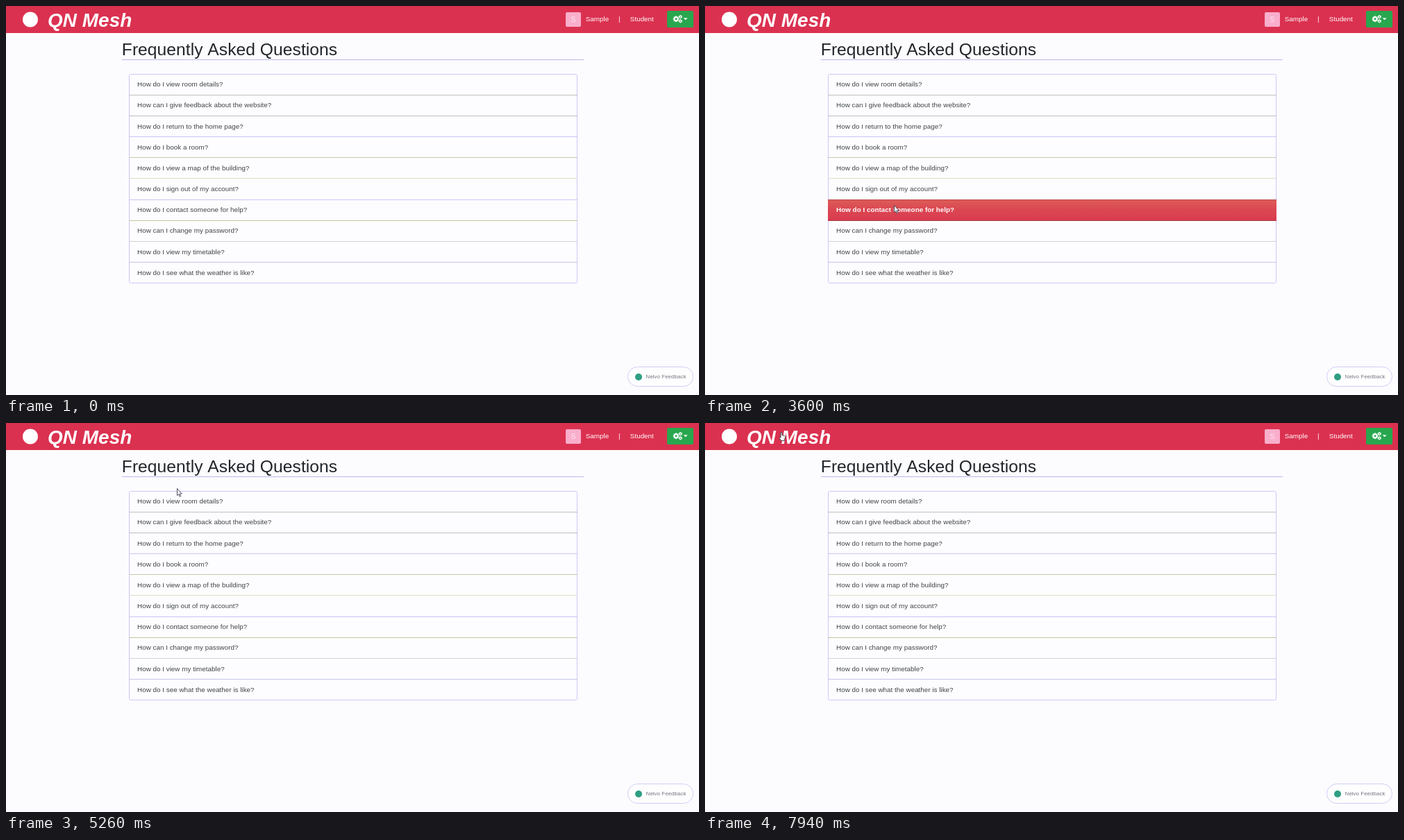
These frames come from a looping animation (998x561 px, 8 s). An HTML page with a canvas:

```html
<!DOCTYPE html>
<html lang="en">
<head>
<meta charset="utf-8">
<title>FAQ</title>
<style>
  html, body { margin: 0; width: 100%; height: 100%; overflow: hidden; background: #fcfcff; }
  canvas { display: block; }
</style>
</head>
<body>
<canvas id="stage" width="998" height="561"></canvas>
<script>
const ctx = document.getElementById('stage').getContext('2d');
const LOOP = 8000;
const HOVER_LAG = 80;
const LIST = { left: 177, right: 823, top: 97.6, step: 30.15 };

const questions = [
  'How do I view room details?',
  'How can I give feedback about the website?',
  'How do I return to the home page?',
  'How do I book a room?',
  'How do I view a map of the building?',
  'How do I sign out of my account?',
  'How do I contact someone for help?',
  'How can I change my password?',
  'How do I view my timetable?',
  'How do I see what the weather is like?'
];
const dividers = ['#c0c0bc', '#bebbc0', '#c8c5f5', '#c9c8ab', '#dddcc6',
                  '#c8c5f5', '#c5c4a2', '#d2d2d2', '#c4c4e8'];

// Pointer path: time, x, y
const path = [
  [500, 480, 405], [1180, 446, 405], [1320, 445, 405], [2020, 445, 405],
  [2400, 443, 400], [2760, 440, 396], [2880, 440, 396], [3140, 433, 396],
  [3300, 375, 358], [3480, 297, 303], [3600, 272, 287], [3700, 272, 287],
  [4440, 261, 192], [4540, 261, 192], [4880, 255, 160], [4960, 253, 150],
  [5180, 247, 97], [5280, 246, 93], [5380, 246, 93], [6120, 202, 69],
  [6220, 202, 69], [6960, 127, 30], [7060, 127, 30], [7800, 110, 13]
];

function pointerAt(t) {
  if (t < path[0][0]) return null;
  const i = path.findIndex(p => p[0] > t);
  if (i < 0) return path[path.length - 1].slice(1);
  const [t0, x0, y0] = path[i - 1], [t1, x1, y1] = path[i];
  const k = (t - t0) / (t1 - t0);
  return [Math.round(x0 + (x1 - x0) * k), Math.round(y0 + (y1 - y0) * k)];
}

const rowTop = i => Math.round(LIST.top + LIST.step * i);

function hoveredRow(t) {
  const p = pointerAt(t - HOVER_LAG);
  return p ? Math.floor((p[1] - LIST.top) / LIST.step) : -1;
}

// Large font scaled down keeps fractional sizes accurate
function text(str, x, y, size, color, style = '') {
  ctx.save();
  ctx.translate(x, y);
  ctx.scale(0.1, 0.1);
  ctx.font = `${style} ${size * 10}px "Liberation Sans", Arial, sans-serif`;
  ctx.fillStyle = color;
  ctx.fillText(str, 0, 0);
  ctx.restore();
}

function box(x, y, w, h, r, fill, stroke) {
  ctx.beginPath();
  ctx.roundRect(x, y, w, h, r);
  if (fill) { ctx.fillStyle = fill; ctx.fill(); }
  if (stroke) { ctx.strokeStyle = stroke; ctx.lineWidth = 1; ctx.stroke(); }
}

function disc(x, y, r, color) {
  ctx.beginPath();
  ctx.arc(x, y, r, 0, Math.PI * 2);
  ctx.fillStyle = color;
  ctx.fill();
}

function polygon(points, color) {
  ctx.beginPath();
  points.forEach(([x, y]) => ctx.lineTo(x, y));
  ctx.closePath();
  ctx.fillStyle = color;
  ctx.fill();
}

function gear(x, y, r, teeth) {
  ctx.save();
  ctx.translate(x, y);
  disc(0, 0, r * 0.78, '#fff');
  for (let i = 0; i < teeth; i++) {
    ctx.fillRect(-r * 0.2, -r, r * 0.4, r);
    ctx.rotate(Math.PI * 2 / teeth);
  }
  disc(0, 0, r * 0.34, '#28a74e');
  ctx.restore();
}

function drawHeader() {
  ctx.fillStyle = '#db3150';
  ctx.fillRect(0, 0, 998, 39);
  disc(35, 19.5, 11, '#fff');
  text('QN Mesh', 60, 30, 28, '#fff', 'italic bold');

  box(806, 9, 22, 21, 2, '#f9aecb');
  text('S', 813.4, 23, 10.5, '#fde6f0');
  text('Sample', 834.7, 22.2, 9.88, '#fff');
  text('|', 882, 22.2, 9.88, '#fff');
  text('Student', 898.8, 22.2, 9.88, '#fff');

  box(952, 7, 38, 24, 2, '#28a74e');
  gear(965, 18.7, 4.4, 8);
  gear(971.3, 15.6, 2.7, 6);
  gear(971.3, 21.8, 2.7, 6);
  polygon([[975.6, 17.3], [981.6, 17.3], [978.6, 20.3]], '#fff');
}

function drawList(active) {
  text('Frequently Asked Questions', 166.8, 71.2, 24.7, '#212529');
  ctx.fillStyle = '#bbb8ef';
  ctx.fillRect(167, 77, 665, 1);

  const { left, right } = LIST, width = right - left;
  box(left + 0.5, 98.5, width - 1, 301, 2, '#fdfdff', '#cbc7f7');
  dividers.forEach((color, i) => {
    ctx.fillStyle = color;
    ctx.fillRect(left, rowTop(i + 1), width, 1);
  });

  questions.forEach((q, i) => {
    const on = i === active;
    if (on) {
      const y = rowTop(i), h = rowTop(i + 1) - y + 1;
      const g = ctx.createLinearGradient(0, y, 0, y + h);
      g.addColorStop(0, '#dc5c58');
      g.addColorStop(0.5, '#db4652');
      g.addColorStop(1, '#da3b50');
      ctx.fillStyle = g;
      ctx.fillRect(left, y, width, h);
      ctx.fillStyle = '#b94c48';
      ctx.fillRect(left, y, width, 1);
      ctx.fillStyle = '#a5383f';
      ctx.fillRect(left, y + h - 1, width, 1);
    }
    text(q, 189, 116.3 + LIST.step * i, 9.88, on ? '#fff' : '#3f4347', on ? 'bold' : '');
  });
}

function drawFeedback() {
  box(895.5, 520.5, 94, 28, 14, '#fefeff', '#cfcdf4');
  disc(911, 535, 5, '#2f9e83');
  text('Nelvo Feedback', 921.6, 537, 8, '#74777f');
}

function strokeFill(fill, line) {
  ctx.fillStyle = fill;
  ctx.fill();
  ctx.strokeStyle = line;
  ctx.lineWidth = 0.9;
  ctx.lineJoin = 'round';
  ctx.stroke();
}

function arrow() {
  ctx.beginPath();
  [[0.5, 0.5], [0.5, 10.6], [2.7, 8.6], [4.2, 12.2], [5.7, 11.5], [4.2, 8], [7.2, 8]]
    .forEach(([x, y]) => ctx.lineTo(x, y));
  ctx.closePath();
  strokeFill('#fff', '#3c3c50');
}

function beam() {
  ctx.fillStyle = '#55555c';
  ctx.fillRect(0, -4, 1, 9);
  ctx.fillRect(-2, -5, 2, 1);
  ctx.fillRect(1, -5, 2, 1);
  ctx.fillRect(-2, 5, 2, 1);
  ctx.fillRect(1, 5, 2, 1);
}

function hand() {
  ctx.beginPath();
  ctx.moveTo(-1, 8);
  ctx.lineTo(-1, 1);
  ctx.quadraticCurveTo(0, -0.5, 1, 1);
  ctx.lineTo(1, 4.6);
  ctx.lineTo(4.6, 5.4);
  ctx.quadraticCurveTo(5.7, 5.8, 5.6, 7.4);
  ctx.lineTo(4.6, 10.4);
  ctx.lineTo(4.4, 12.6);
  ctx.lineTo(-0.4, 12.6);
  ctx.lineTo(-3, 8.4);
  ctx.quadraticCurveTo(-3, 6.6, -1, 8);
  ctx.closePath();
  strokeFill('#fff', '#33333c');
}

function drawPointer(t) {
  const p = pointerAt(t);
  if (!p) return;
  const [x, y] = p;
  const onBrand = y < 35 && x > 15 && x < 182;
  const onTitle = y > 48 && y < 78 && x > 167;
  ctx.save();
  ctx.translate(x, y);
  (onBrand ? hand : onTitle ? beam : arrow)();
  ctx.restore();
}

function draw(t) {
  ctx.fillStyle = '#fcfcff';
  ctx.fillRect(0, 0, 998, 561);
  drawHeader();
  drawList(hoveredRow(t));
  drawFeedback();
  drawPointer(t);
}

const start = performance.now();
function tick() {
  draw((performance.now() - start) % LOOP);
  requestAnimationFrame(tick);
}
tick();
</script>
</body>
</html>
```
